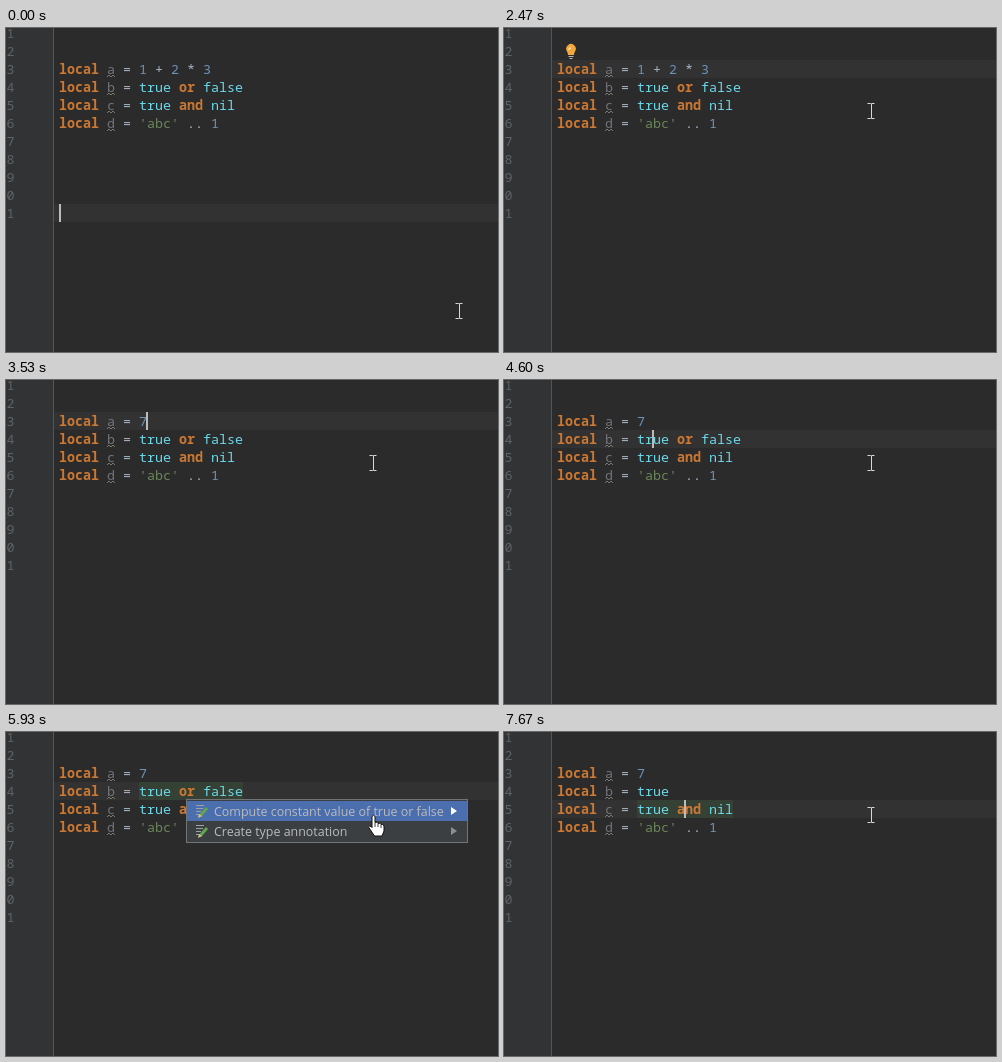
Write an HTML page that moves like this. It is 492 by 324 pixels and loops after 8000 ms.

```html
<!DOCTYPE html>
<html lang="en">
<head>
<meta charset="utf-8">
<title>Constant folding in an editor</title>
<style>
  html, body { margin: 0; width: 100%; height: 100%; overflow: hidden; background: #2b2b2b; }
  svg { display: block; }
  text { white-space: pre; }
  .code { font: 13.33px "Noto Sans Mono", "DejaVu Sans Mono", monospace; fill: #a9b7c6; }
  .keyword { fill: #cc7832; font-weight: bold; }
  .constant { fill: #6ad9ea; }
  .number { fill: #6c92b8; }
  .string { fill: #6a8759; }
  .unused { fill: #72737a; }
  .gutter { fill: #606366; }
  .menu { font: 12.45px "Open Sans", "Noto Sans", sans-serif; fill: #bbb; }
</style>
</head>
<body>
<svg id="stage" width="492" height="324"></svg>
<script>
const LOOP = 8000, TICK = 200 / 3, LEFT = 53, CELL = 8, LINE = 18;
const stage = document.getElementById('stage');

// start time, row, column (-1 hides the caret)
const carets = [
  [0, 11, 0], [870, 11, -1], [1400, 11, 0], [1600, 3, 13], [2470, 3, -1],
  [3530, 3, 11], [4400, 4, 11], [4600, 4, 12], [4800, 4, 13], [4930, 4, 14],
  [5070, 4, 15], [5200, 4, 16], [5870, 4, -1], [6670, 4, 16], [6730, 4, 14],
  [7330, 5, 14], [7530, 5, 15], [7670, 5, 16]
];

// tick, x, y
const path = [[9, 453, 283], [20, 165, 54], [22, 158, 45], [24, 158, 45], [30, 367, 83]];

const rowY = row => (row - 3) * LINE + 32;
const colX = col => LEFT + col * CELL;
const within = (t, from, to) => t >= from && t < to;
const rect = (x, y, w, h, fill, stroke = 'none') =>
  `<rect x="${x}" y="${y}" width="${w}" height="${h}" fill="${fill}" stroke="${stroke}"/>`;
const text = (cls, x, y, body) => `<text class="${cls}" x="${x}" y="${y}">${body}</text>`;

function tokenClass(word) {
  if (/^(local|or|and)$/.test(word)) return 'keyword';
  if (/^(true|false|nil)$/.test(word)) return 'constant';
  if (/^\d/.test(word)) return 'number';
  return word[0] === "'" ? 'string' : 'unused';
}

const paint = line => line.replace(/'\w+'|\w+/g,
  word => `<tspan class="${tokenClass(word)}">${word}</tspan>`);

function codeLine(row, name, value) {
  const y = rowY(row);
  return text('code', LEFT, y + 14, paint(`local ${name} = ${value}`)) +
    `<path d="M101 ${y + 17}l2-2 2 2 2-2 2 2" fill="none" stroke="#77786f"/>`;
}

function mouseAt(t) {
  const n = Math.floor((t + 4) / TICK);
  const i = path.findIndex(p => p[0] > n);
  if (i === 0) return path[0].slice(1);
  if (i < 0) return path[path.length - 1].slice(1);
  const [a, b] = [path[i - 1], path[i]];
  const u = (n - a[0]) / (b[0] - a[0]);
  const e = u * u * (3 - 2 * u);
  return [1, 2].map(k => Math.round(a[k] + (b[k] - a[k]) * e));
}

function pointer(t) {
  const [x, y] = mouseAt(t);
  const hand = within(t, 2800, 3530) || within(t, 5930, 6670);
  const shape = hand
    ? `<path d="M-1 1.5q1.5-2.5 3 0v6q2-1 3 1q2-1 3 1q2-1 3 1.5v5l-2 5h-7.5l-4-6-2-3q1-2 3 0l.5.5z"
        fill="#fff" stroke="#111"/><path d="M2 8v4m3-3v3m3-2v3" stroke="#111" stroke-width=".8"/>`
    : '<path d="M-3.5-7.5h3l.5.5.5-.5h3M.5-7v14M-3.5 7.5h3l.5-.5.5.5h3" fill="none" stroke="#d8d8d8"/>';
  return `<g transform="translate(${x} ${y})">${shape}</g>`;
}

function menuItem(y, width, label, arrow) {
  return `<path d="M10 ${y - 5.5}h8m-8 3h7m-7 3h5m-5 3h4" stroke="#9da2a6"/>
    <path d="M14 ${y + 5}l7-8" stroke="#62a650" stroke-width="3"/>
    <path d="M12 ${y + 7}l1-4 3 2z" fill="#d9c08c"/>` +
    text('menu', 28, y + 4.5, label) +
    `<path d="M${width - 17} ${y - 4}l6 4-6 4z" fill="${arrow}"/>`;
}

function menu(x, y, width, expression) {
  return `<g transform="translate(${x} ${y})">` +
    rect(0.5, 0.5, width - 1, 43, '#3c3f41', '#727476') +
    rect(1, 2, width - 2, 20, '#4b6eaf') +
    menuItem(12, width, `Compute constant value of ${expression}`, '#fff') +
    menuItem(32, width, 'Create type annotation', '#8c8e90') + '</g>';
}

const bulb = `<path d="M64 27q0-2-1-3.5a4.8 4.8 0 1 1 8 0q-1 1.5-1 3.5z" fill="#f2a73d"/>
  <path d="M65 22q0-2 2-2" fill="none" stroke="#ffe0a0" stroke-width="1.5"/>
  <path d="M64.5 28.5h5m-4 2h3" stroke="#b5b5b5"/>`;

function numbers() {
  let out = '';
  for (let row = 1; row <= 11; row++) out += text('code gutter', 0.5, rowY(row) + 14, row % 10);
  return out;
}

function view(t) {
  const [, row, col] = carets.filter(c => c[0] <= t).pop();
  const folded = t >= 6730;
  let out = rect(0, 0, 47, 324, '#313335') + rect(47, 0, 1, 324, '#555') +
    numbers() + rect(48, rowY(row), 444, LINE, '#323232');

  if (within(t, 5200, 7000)) out += rect(colX(10), rowY(4), folded ? 32 : 104, LINE, '#344134');
  if (t >= 7670) out += rect(colX(10), rowY(5), 96, LINE, '#344134');

  out += codeLine(3, 'a', t < 3530 ? '1 + 2 * 3' : '7') +
    codeLine(4, 'b', folded ? 'true' : 'true or false') +
    codeLine(5, 'c', 'true and nil') +
    codeLine(6, 'd', "'abc' .. 1");

  if (col >= 0) out += rect(Math.max(LEFT, colX(col) - 1), rowY(row), 2, LINE, '#bbb');
  if (within(t, 2400, 2730)) out += bulb;
  if (within(t, 2730, 3530)) out += menu(156, 49, 262, '1 + 2 * 3');
  if (within(t, 5870, 6670)) out += menu(180, 67, 282, 'true or false');
  return out + pointer(t);
}

let shown = '';
const start = performance.now();

function frame() {
  const next = view((performance.now() - start) % LOOP);
  if (next !== shown) stage.innerHTML = shown = next;
  requestAnimationFrame(frame);
}
frame();
</script>
</body>
</html>
```
